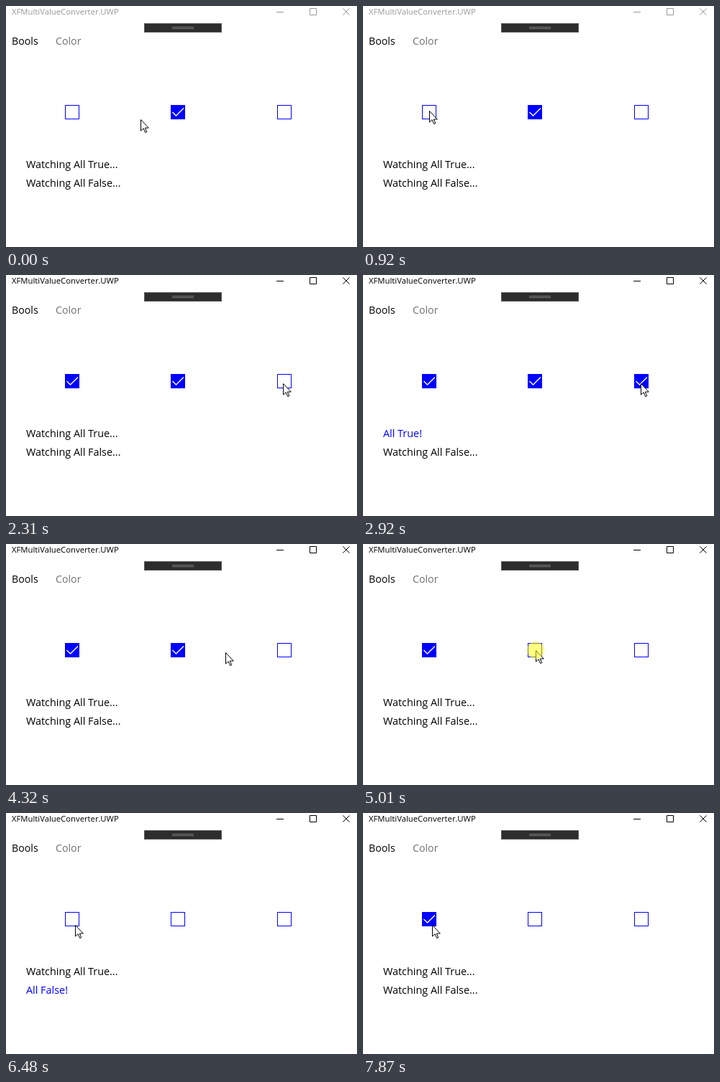
An HTML page that plays this animation: 488 by 336 pixels, repeating every 9430 ms.

```html
<!DOCTYPE html>
<html lang="en">
<head>
<meta charset="utf-8">
<title>Multi value converter</title>
<style>
  html, body { margin: 0; width: 100%; height: 100%; overflow: hidden; background: #fff; }
  svg { display: block; }
  text { font: 14.2px "Open Sans", "Noto Sans", sans-serif; }
  .label { font-size: 14.4px; }
  .done { fill: #00f; }
  #chrome { --ink: #999; }
  #chrome.active { --ink: #000; }
  #chrome text { font-size: 11.3px; fill: var(--ink); }
  #chrome path { fill: none; stroke: var(--ink); }
  .box rect { fill: #fff; stroke: #00f; }
  .box path { fill: none; stroke: #fff; stroke-width: 1.4; visibility: hidden; }
  .box.on rect { fill: #00f; }
  .box.on path { visibility: visible; }
</style>
</head>
<body>
<svg width="488" height="336" viewBox="0 0 488 336">
  <g id="chrome">
    <text x="8" y="12">XFMultiValueConverter.UWP</text>
    <path d="M376 8.5h10M422.5 3.5h9v9h-9z"/>
    <path d="M468.4 3.4l9.2 9.2M477.6 3.4l-9.2 9.2"/>
  </g>
  <rect x="192.5" y="24.5" width="107" height="12" fill="#2d2d2d" stroke="#5a5a5a"/>
  <path d="M231 29.5h30M231 31.5h30" stroke="#777"/>
  <text x="8" y="54">Bools</text>
  <text x="69" y="54" fill="#707070">Color</text>

  <g id="boxes"></g>

  <text id="allTrue" class="label" x="28" y="226"></text>
  <text id="allFalse" class="label" x="28" y="252"></text>

  <g id="pointer">
    <path d="M.5.5V16l3.6-3.4 2.6 5.9 2.1-.9-2.5-5.6h5z" fill="#fff" stroke="#000"/>
    <circle id="press" r="12" fill="#ff0" fill-opacity=".5"/>
  </g>
</svg>
<script>
const LOOP = 9430;
const STEP = 76.6; // the pointer is redrawn at this interval (ms)
const HOME = [187, 158];

const smooth = p => { const q = p ** 1.13; return q * q * (3 - 2 * q); };
const easeOut = p => 1 - (1 - p) ** 2.8;

const moves = [
  { start: 530, steps: 6, to: [92, 146], ease: smooth },
  { start: 1540, steps: 8, to: [374, 151], ease: smooth, sag: 5 },
  { start: 2230, steps: 3, to: [386, 151], ease: easeOut },
  { start: 4240, steps: 8, to: [240, 148], ease: easeOut, sag: 2 },
  { start: 5320, steps: 6, to: [97, 156], ease: smooth },
  { start: 5930, steps: 1, to: [96, 156], ease: smooth },
];

const clicks = [
  { down: 1150, up: 1220, box: 0 },
  { down: 2770, up: 2920, box: 2 },
  { down: 3930, up: 4010, box: 2 },
  { down: 5010, up: 5090, box: 1 },
  { down: 6400, up: 6480, box: 0 },
  { down: 7790, up: 7870, box: 0 },
];

const $ = id => document.getElementById(id);

$('boxes').innerHTML = [82, 229, 377].map(x => `
  <g class="box" transform="translate(${x} 138)">
    <rect x=".5" y=".5" width="19" height="19"/>
    <path d="M2.5 10l5 5 10.5-10.5"/>
  </g>`).join('');
const boxes = [...document.querySelectorAll('.box')];

function pointerAt(t) {
  let at = HOME;
  for (const { start, steps, to, ease, sag = 0 } of moves) {
    if (t < start) break;
    const p = Math.min(steps, Math.floor((t - start) / STEP) + 1) / steps;
    const [x, y] = at.map((from, i) => from + (to[i] - from) * ease(p));
    at = [Math.round(x), Math.round(y + sag * Math.sin(Math.PI * p))];
  }
  return at;
}

// A box is cleared on press and ticked on release
function checkedAt(t) {
  const checked = [false, true, false];
  for (const { down, up, box } of clicks) {
    if (t >= (checked[box] ? down : up)) checked[box] = !checked[box];
  }
  return checked;
}

function setLabel(el, name, done) {
  el.textContent = done ? `${name}!` : `Watching ${name}...`;
  el.classList.toggle('done', done);
}

function draw(t) {
  const checked = checkedAt(t);
  boxes.forEach((el, i) => el.classList.toggle('on', checked[i]));
  setLabel($('allTrue'), 'All True', checked.every(Boolean));
  setLabel($('allFalse'), 'All False', !checked.some(Boolean));

  const pressed = clicks.some(c => t >= c.down && t < c.up);
  $('pointer').setAttribute('transform', `translate(${pointerAt(t)})`);
  $('press').setAttribute('visibility', pressed ? 'visible' : 'hidden');
  $('chrome').classList.toggle('active', t >= clicks[0].down);
}

const origin = performance.now();
function tick() {
  draw((performance.now() - origin) % LOOP);
  requestAnimationFrame(tick);
}
tick();
</script>
</body>
</html>
```
